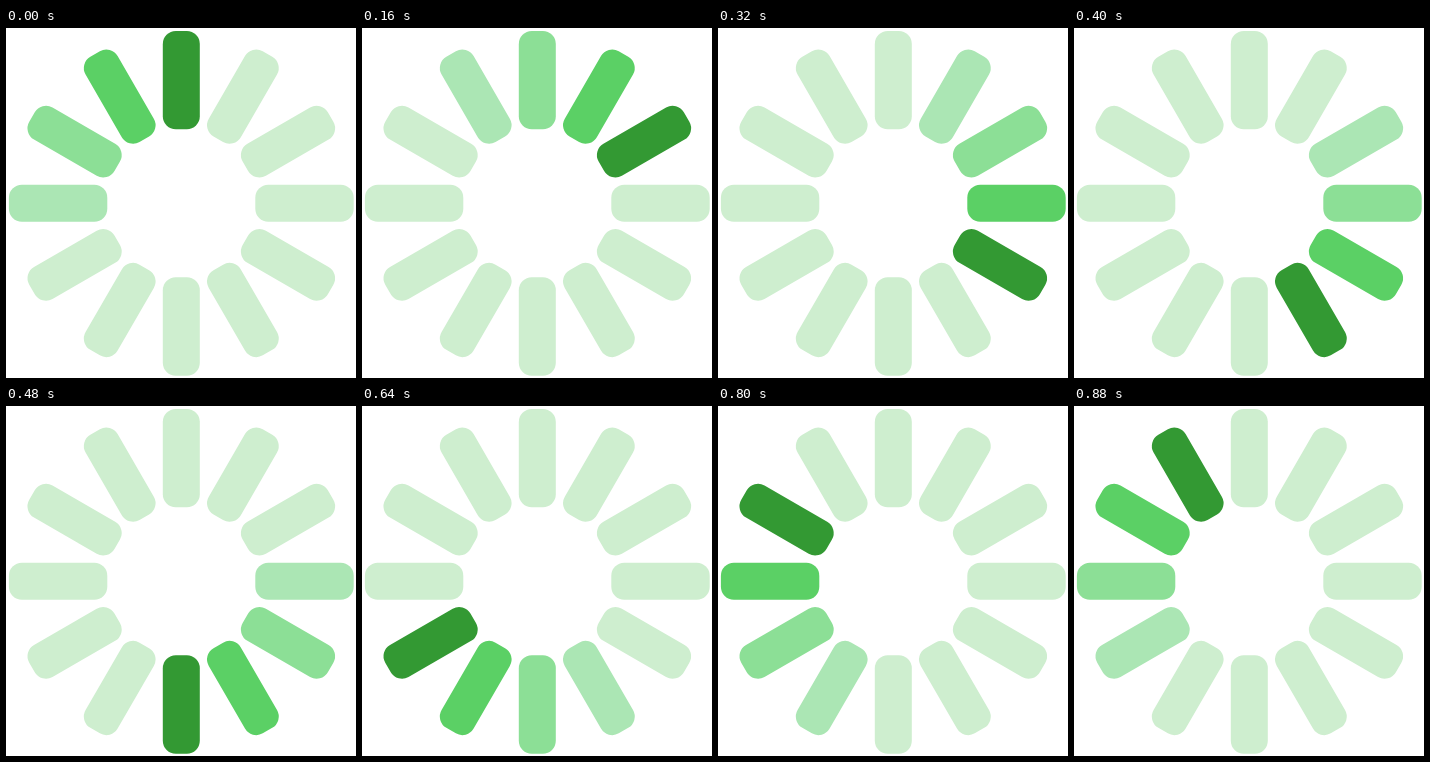
An HTML page that plays this animation: 350x350 px, repeating every 960 ms.

```html
<!DOCTYPE html>
<html lang="en">
<head>
<meta charset="utf-8">
<title>Loading</title>
<style>
  html, body { margin: 0; width: 100%; height: 100%; overflow: hidden; background: #fff; }
  svg { display: block; width: 350px; height: 350px; }
  rect {
    transform: rotate(calc(var(--i) * 30deg));
    fill: #ceeecf;
    animation: fade 960ms step-end calc((var(--i) - 12) * 80ms) infinite;
  }
  /* each bar lights up, then dims one step every 80 ms */
  @keyframes fade {
    0% { fill: #339933; }
    8.333% { fill: #5bd065; }
    16.666% { fill: #8cdf96; }
    25% { fill: #abe6b4; }
    33.333%, 100% { fill: #ceeecf; }
  }
</style>
</head>
<body>
<svg viewBox="0 0 350 350">
  <g id="bars" transform="translate(175.3 175.3)"></g>
</svg>
<script>
  const bars = document.getElementById('bars');
  for (let i = 0; i < 12; i++) {
    const bar = document.createElementNS('http://www.w3.org/2000/svg', 'rect');
    const box = { x: -18.5, y: -172.4, width: 37, height: 98.4, rx: 13 };
    for (const key in box) bar.setAttribute(key, box[key]);
    bar.style.setProperty('--i', i);
    bars.append(bar);
  }
</script>
</body>
</html>
```
